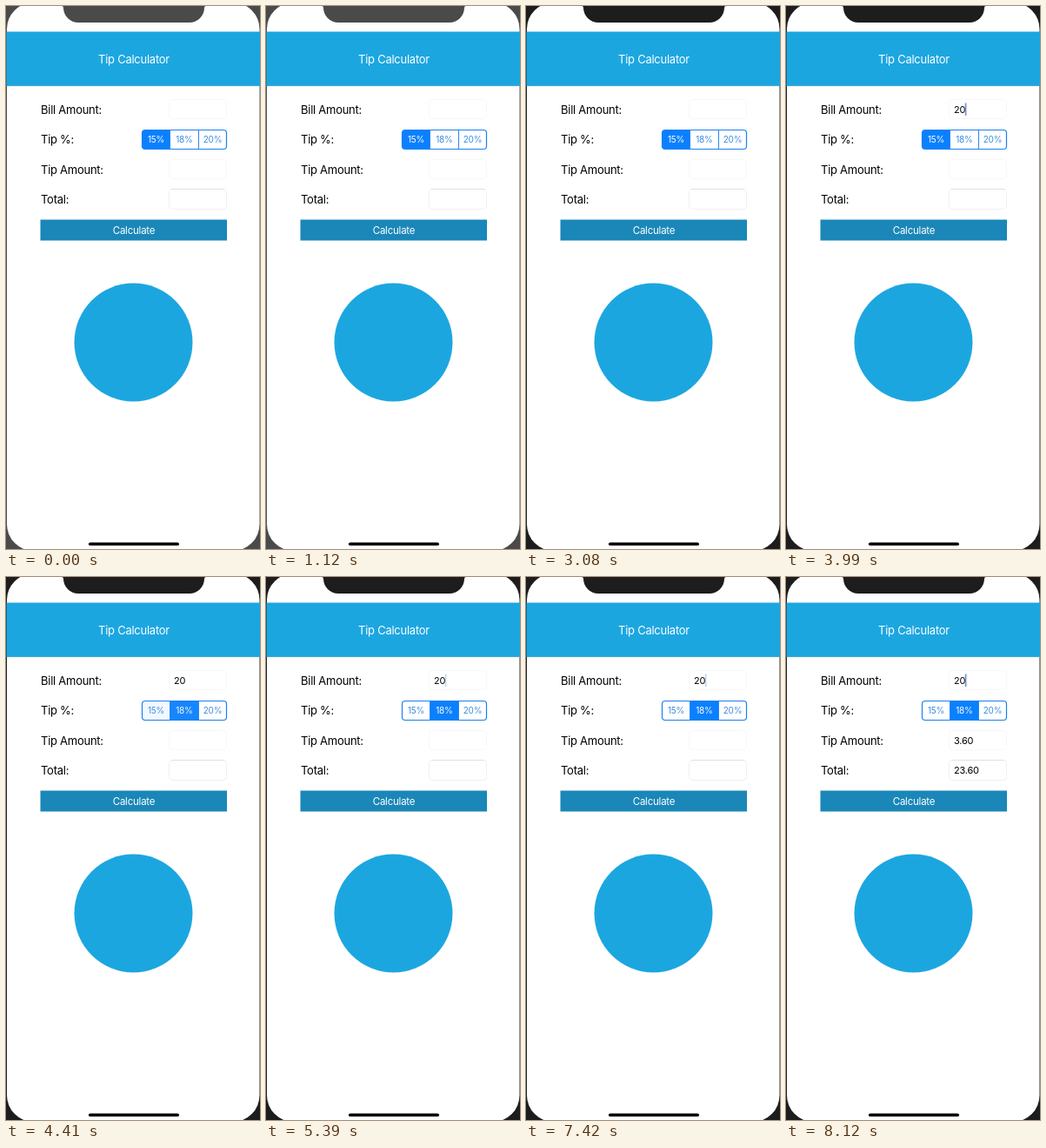
These frames come from a looping animation (292 px wide and 624 px high, 8190 ms). An HTML page:

```html
<!DOCTYPE html>
<html lang="en">
<head>
<meta charset="utf-8">
<title>Tip Calculator</title>
<style>
html, body { margin: 0; width: 100%; height: 100%; overflow: hidden; background: #fff; }
svg { display: block; width: 292px; height: 624px; }
text { font: 13px Inter, Roboto, sans-serif; letter-spacing: -.02em; fill: #000; }
.mid { text-anchor: middle; }
.title, .button { fill: #fff; }
.button { font-size: 11.5px; }
.value { font-size: 11px; }
.choice { font-size: 10px; fill: #3d8cdf; }
.field { fill: #fff; stroke: #f7f7f7; }
.field.strong { stroke: #f0f0f0; }
</style>
</head>
<body>
<svg viewBox="0 0 292 624">
  <rect width="292" height="624" fill="#fff"/>

  <text x="40" y="124">Bill Amount:</text>
  <text x="40" y="158">Tip %:</text>
  <text x="40" y="192.5">Tip Amount:</text>
  <text x="40" y="227">Total:</text>

  <rect class="field" x="187.5" y="107.5" width="66" height="22" rx="4"/>
  <rect class="field" x="187.5" y="176.5" width="66" height="22" rx="4"/>
  <rect class="field strong" x="187.5" y="210.5" width="66" height="23" rx="4"/>
  <path d="M190 210.5H251" stroke="#e0e0e0"/>

  <path id="seg15" d="M189 142.5H160a3.5 3.5 0 0 0 -3.5 3.5V161a3.5 3.5 0 0 0 3.5 3.5H189Z" fill="#0a80ff"/>
  <rect id="seg18" x="188.5" y="142.5" width="33" height="22" fill="#0a80ff"/>
  <rect x="156.5" y="142.5" width="97" height="22" rx="3.5" fill="none" stroke="#1a80f0" stroke-width="1.2"/>
  <path d="M188.5 142.5V164.5M221.5 142.5V164.5" stroke="#2b88f0"/>
  <text id="pick15" class="mid choice" x="172.5" y="157.3">15%</text>
  <text id="pick18" class="mid choice" x="205" y="157.3">18%</text>
  <text class="mid choice" x="237.5" y="157.3">20%</text>

  <text id="two" class="value" x="193" y="123">2</text>
  <text id="twenty" class="value" x="193" y="123">20</text>
  <g id="results">
    <text class="value" x="193" y="191.5">3.60</text>
    <text class="value" x="193" y="226">23.60</text>
  </g>
  <rect id="caret" x="193.2" y="111.5" width="1.2" height="14.5" fill="#3f66b8"/>

  <rect x="39.5" y="245.5" width="214.5" height="24" fill="#1a87b8"/>
  <text class="mid button" x="147" y="262">Calculate</text>
  <circle cx="146.5" cy="386.5" r="68" fill="#1ca6e0"/>

  <g id="bezel" fill="#4a4a4a">
    <path fill-rule="evenodd" d="M0 0H292V624H0ZM31.5 -4H261a30.5 30.5 0 0 1 30.5 30.5V595.5a30.5 30.5 0 0 1 -30.5 30.5H31.5a30.5 30.5 0 0 1 -30.5 -30.5V26.5a30.5 30.5 0 0 1 30.5 -30.5Z"/>
    <path d="M64 0Q66 0 66 2a17 17 0 0 0 17 17H211a17 17 0 0 0 17 -17Q228 0 230 0Z"/>
  </g>
  <rect x="95" y="616.4" width="104" height="3.7" rx="1.85" fill="#000"/>

  <rect x=".5" y="29.5" width="291.5" height="62.5" fill="#1ca6e0"/>
  <path d="M1 91.7H292" stroke="#6fa9c4" stroke-width=".5"/>
  <text class="mid title" x="147" y="65.7">Tip Calculator</text>
</svg>
<script>
const LOOP = 8190;
const start = document.timeline.currentTime ?? 0;

// Points are [ms, value]; equal times make a hard change.
function track(id, prop, points) {
  const all = [[0, points[0][1]], ...points, [LOOP, points.at(-1)[1]]];
  const frames = all.map(([ms, value]) => ({ offset: ms / LOOP, [prop]: value }));
  const anim = document.getElementById(id).animate(frames, { duration: LOOP, iterations: Infinity });
  anim.startTime = start;
}
const cut = (ms, before, after) => [[ms, before], [ms, after]];
const fade = (from, to, before, after) => [[from, before], [to, after]];

const FIRST_KEY = 3360, SECOND_KEY = 3640;
const PICK = [4130, 4425];
const BLUE = '#3d8cdf', WHITE = '#ffffff';

track('bezel', 'fill', cut(1190, '#4a4a4a', '#1d1d1d'));
track('two', 'opacity', [...cut(FIRST_KEY, 0, 1), ...cut(SECOND_KEY, 1, 0)]);
track('twenty', 'opacity', cut(SECOND_KEY, 0, 1));
track('results', 'opacity', cut(7560, 0, 1));

track('seg15', 'opacity', fade(...PICK, 1, 0));
track('seg18', 'opacity', fade(...PICK, 0, 1));
track('pick15', 'fill', fade(...PICK, WHITE, BLUE));
track('pick18', 'fill', fade(...PICK, BLUE, WHITE));

track('caret', 'transform', [
  ...cut(FIRST_KEY, 'translateX(0px)', 'translateX(6.3px)'),
  ...cut(SECOND_KEY, 'translateX(6.3px)', 'translateX(12.8px)')
]);
const blinks = [[1500, 1980], [2600, 3080], [4150, 4700], [5240, 5730], [6290, 6790], [7280, 7780]];
track('caret', 'opacity', [
  ...cut(1260, 0, 1),
  ...blinks.flatMap(([out, back]) => [...fade(out, out + 240, 1, 0), ...fade(back, back + 150, 0, 1)])
]);
</script>
</body>
</html>
```
